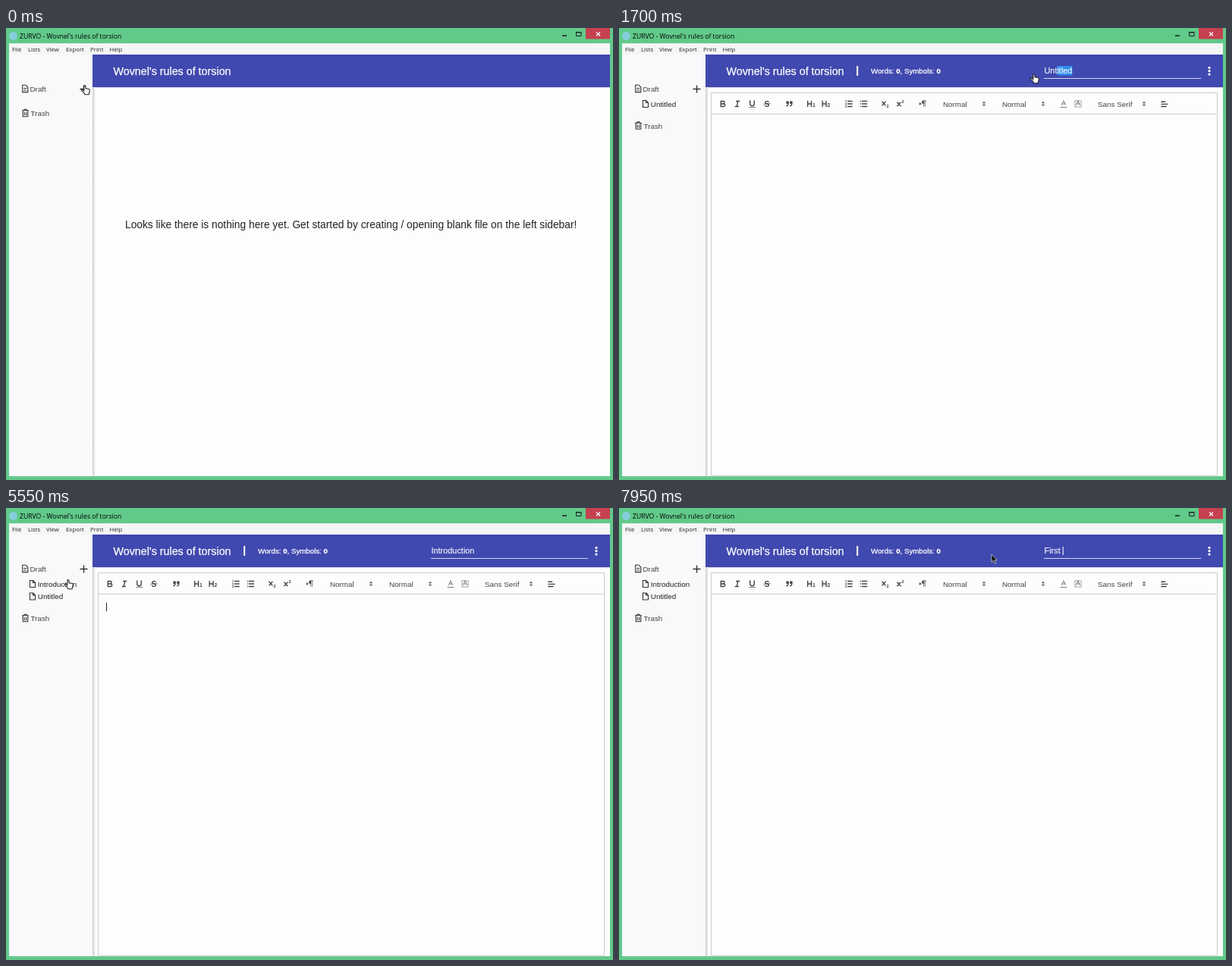
Write an HTML page that moves like this. It is 800 px wide and 596 px high and loops after 8 s.

```html
<!DOCTYPE html>
<html lang="en">
<head>
<meta charset="utf-8">
<title>Editor</title>
<style>
html, body { margin: 0; width: 100%; height: 100%; overflow: hidden; background: #61c98a }
svg { display: block; width: 800px; height: 596px; font: 9.86px "Liberation Sans", Arial, sans-serif }
text { white-space: pre }
.ui { font-family: "Open Sans", "Noto Sans", sans-serif }
.ink { fill: none; stroke: #444; stroke-width: 2; stroke-linecap: round; stroke-linejoin: round }
.ink .thin { stroke-width: 1 }
.ink .fill, .ink text { fill: #444; stroke: none }
.side { fill: #444 }
.outline { fill: none; stroke: #333; stroke-width: 1.1 }
.med { fill: #fff; stroke: #fff; stroke-width: .25px }
</style>
</head>
<body>
<svg id="stage" viewBox="0 0 800 596">
  <defs>
    <linearGradient id="shade"><stop stop-color="#000" stop-opacity=".2"/><stop offset="1" stop-color="#000" stop-opacity="0"/></linearGradient>
    <g id="file" class="outline"><path d="M.5.5h4.2l2.8 2.8v6.2h-7zM4.5.5v3h3"/></g>
  </defs>
  <rect width="800" height="596" fill="#61c98a"/>
  <circle cx="9.5" cy="10.5" r="5.5" fill="#84cfdb"/>
  <text class="ui" x="18" y="14" font-size="8.65">ZURVO - Wovnel's rules of torsion</text>
  <path d="M733 10.2h6" stroke="#222" stroke-width="1.6"/>
  <path d="M751.5 5.5h6.5v5h-6.5zM751 6h7.5" fill="none" stroke="#222"/>
  <rect x="764" width="32" height="14.5" fill="#c5414f"/>
  <path d="M778 5.5l5 5m0-5l-5 5" stroke="#fff" stroke-width="1.2"/>
  <rect x="4" y="20.5" width="792" height="570.5" fill="#fefdfe"/>
  <rect x="4" y="20.5" width="792" height="14.5" fill="#f6f5f6"/>
  <g id="menu" class="ui" font-size="7.8" fill="#222"></g>
  <rect x="4" y="35" width="110" height="556" fill="#f9f8fb"/>
  <rect x="114" y="35" width="4" height="556" fill="url(#shade)"/>
  <rect x="114" y="35" width="682" height="43" fill="#4049af"/>
  <rect x="118" y="78" width="678" height="1" fill="#d9d9e3"/>
  <text class="med" x="141.5" y="61.5" font-size="14.3">Wovnel's rules of torsion</text>

  <g class="side">
    <path class="outline" d="M21.7 75.2h4.3l2.8 2.8v6.6h-7.1zM23.2 79.5h4M23.2 82h4"/>
    <text x="31.5" y="83.5">Draft</text>
    <path d="M97.5 80.5h10m-5-5v10" stroke="#333" stroke-width="1.4"/>
    <g id="items" fill="#222"></g>
    <g id="trash">
      <path class="outline" d="M21 -6.2h9M24 -6.5v-1.3h3v1.3M22.2 -6v7.8h6.6v-7.8M24.3 -4v4.3M26.7 -4v4.3"/>
      <text x="32.5" y="1">Trash</text>
    </g>
  </g>

  <text id="empty" x="157" y="264" font-size="13.78" fill="#222">Looks like there is nothing here yet. Get started by creating / opening blank file on the left sidebar!</text>

  <g id="editor">
    <path d="M314.2 50v13" stroke="#fff" stroke-width="2"/>
    <text class="med" x="332" y="60" font-size="9.7">Words: <tspan font-weight="bold">0</tspan>, Symbols: <tspan font-weight="bold">0</tspan></text>
    <rect id="sel" y="50" height="12.5" fill="#2f8ef0"/>
    <text id="name" class="med" x="560.5" y="60" font-size="10.9" style="stroke-width:.1px"></text>
    <rect id="nameCaret" y="51" width="1" height="11" fill="#fff"/>
    <path d="M560 66.5h207" stroke="#d5d7ef"/>
    <g fill="#fff"><circle cx="778" cy="52.3" r="1.6"/><circle cx="778" cy="56.7" r="1.6"/><circle cx="778" cy="61.1" r="1.6"/></g>
    <path d="M121.5 85.5h667v504.500h-667zM121.500 113.5h667" fill="none" stroke="#ccc"/>
    <g id="tools" class="ink"></g>
    <path id="bodyCaret" d="M132.5 125v11" stroke="#222"/>
  </g>

  <g id="toast">
    <rect x="301" y="558" width="198" height="33" rx="3" fill="#323032"/>
    <text class="med" x="373" y="578">Created!</text>
  </g>
  <rect y="591" width="800" height="5" fill="#61c98a"/>

  <g id="cursor">
    <path id="arrow" d="M0 0v10.500l2.400-2.200 1.700 4 1.700-.8-1.700-3.800h3.300z" fill="#111" stroke="#fff" stroke-width=".6"/>
    <path id="hand" d="M1 1.200q1.300-1.200 2 .3v3.200l4.200.8q1.200.4 1.100 1.800l-.6 3.200-.8 2.200h-5l-1.300-2.300-3.200-3q.3-1.500 1.800-.8l1.500 1.200z" fill="#fff" stroke="#222" stroke-width="1.100"/>
  </g>
</svg>
<script>
const el = id => document.getElementById(id);
const show = (id, on) => el(id).setAttribute("visibility", on ? "visible" : "hidden");
const label = (x, y, s, more = "") => `<text x="${x}" y="${y}" ${more}>${s}</text>`;

el("menu").innerHTML = [[8, "File"], [29, "Lists"], [53, "View"], [79, "Export"], [111, "Print"], [136.500, "Help"]]
  .map(([x, s]) => label(x, 30.5, s)).join("");

// Toolbar icons live in an 18-unit box centred on (x, 100)
const icon = (x, body, id = "") => `<g id="${id}" transform="translate(${x - 6.2} 93.800) scale(.69)">${body}</g>`;
const path = (d, cls = "") => `<path class="${cls}" d="${d}"/>`;
const bold = (x, y, s, size) => label(x, y, s, `font-size="${size}" font-weight="bold"`);
const updown = path("M7 11l2 2 2-2zM7 7l2-2 2 2z", "fill") + path("M7 11l2 2 2-2zM7 7l2-2 2 2z", "thin");
const letterA = path("M5.500 11L9 3l3.500 8M6.400 9h5.200", "thin");

el("tools").innerHTML = [
  icon(137, path("M5 4h4.500a2.500 2.500 0 0 1 0 5H5zM5 9h5.500a2.500 2.500 0 0 1 0 5H5z")),
  icon(156, path("M7 4h6M5 14h6M8 14l2-10")),
  icon(175.500, path("M5 3v6a4 4 0 0 0 8 0V3") + path("M3 15.500h12", "thin")),
  icon(195, bold(4, 14.500, "S", 15) + path("M2.500 9.500l13-1", "thin")),
  icon(224.500, path("M4 5h3v3H4zM11 5h3v3h-3z", "fill") + path("M4 5h3v3H4zM11 5h3v3h-3zM7 8q0 4-3 5M14 8q0 4-3 5")),
  icon(253.500, path("M2 4v10M9 4v10M2 9h7") + bold(11, 15, "1", 10)),
  icon(273, path("M2 4v10M9 4v10M2 9h7") + bold(11, 15, "2", 10)),
  icon(303, path("M7 4h8M7 9h8M7 14h8") + path("M2.500 3l1-1v4M2.500 8h1.500l-1.500 2.500h2M2.500 12.500h1.800l-1 1.500 1 1.500h-1.800", "thin")),
  icon(322.500, path("M6 4h9M6 9h9M6 14h9M3 4v.01M3 9v.01M3 14v.01"), "bullets"),
  icon(351, path("M3 5l6 7M9 5l-6 7") + bold(11, 16, "2", 8)),
  icon(371, path("M3 6l6 7M9 6l-6 7") + bold(11, 8, "2", 8)),
  icon(400, path("M3 6l4 3-4 3z", "fill") + path("M11 3a3 3 0 0 0 0 6zM11 3h5M11 4v10M14 4v10", "thin") + path("M11 3a3 3 0 0 0 0 6z", "fill")),
  label(427, 103.500, "Normal"), icon(481, updown),
  label(505, 103.500, "Normal"), icon(559, updown),
  icon(586, letterA + path("M3 15.500h12", "thin")),
  icon(605, letterA + `<rect class="thin" x="3" y="3" width="12" height="12" stroke-dasharray="1 2"/>`),
  label(631, 103.500, "Sans Serif"), icon(692, updown),
  icon(719, path("M3 5h7M3 9.500h12M3 14h9"))
].join("");

const LOOP = 8000;
const route = [
  [0, 102, 75], [150, 102, 75], [600, 228, 120], [750, 220, 119], [1000, 60, 96], [1100, 60, 96],
  [1400, 600, 53], [1500, 600, 53], [1700, 545, 60], [1900, 476, 62], [4200, 476, 62],
  [4500, 430, 122], [4650, 430, 122], [4850, 253, 111], [5150, 102, 76], [5400, 102, 76],
  [5700, 58, 112], [5850, 58, 112], [6150, 584, 52], [6300, 600, 53], [6450, 600, 53],
  [6750, 496, 62], [6900, 491, 61], [LOOP, 491, 61]
];
const typing = [
  ["Introduction", [2600, 2650, 2700, 2850, 2900, 2950, 3150, 3400, 3450, 3500, 3550, 3600]],
  ["First ", [7200, 7300, 7400, 7450, 7550, 7700]]
];
const within = (t, a, b) => t >= a && t < b;
const clamp = v => Math.min(1, Math.max(0, v));
const ease = v => v * v * (3 - 2 * v);

function pointer(t) {
  const i = route.findIndex(p => p[0] > t);
  const [a, x, y] = route[i - 1], [b, u, v] = route[i];
  const k = ease((t - a) / (b - a));
  return [x + (u - x) * k, y + (v - y) * k];
}

function nameAt(t) {
  const [word, times] = typing[t < 5950 ? 0 : 1];
  return word.slice(0, times.filter(k => k <= t).length) || "Untitled";
}

// First selected letter while dragging leftwards; 8 means nothing is selected
function dragStart(t) {
  if (within(t, 1500, 2600)) return Math.max(0, Math.round(8 - (t - 1500) / 40));
  if (within(t, 6450, 7200)) return Math.max(0, Math.round(8 - (t - 6450) / 35));
  return 8;
}

function drawName(t) {
  const name = el("name"), sel = el("sel");
  name.textContent = nameAt(t);
  const end = 560.5 + name.getComputedTextLength();
  const first = dragStart(t);
  const from = first ? 560.5 + name.getSubStringLength(0, Math.min(first, name.textContent.length)) : 560.5;
  sel.setAttribute("x", from);
  sel.setAttribute("width", first < 8 ? Math.max(0, end - from) : 0);
  el("nameCaret").setAttribute("x", end);
  show("nameCaret", within(t, 2600, 4250) || t >= 7200);
}

function draw(t) {
  const items = t < 250 ? [] : [t < 4300 ? "Untitled" : "Introduction"];
  if (t >= 5400) items.push("Untitled");
  el("items").innerHTML = items.map((s, i) =>
    `<use href="#file" x="31" y="${95 + i * 16.500}"/>` + label(41.8, 103.500 + i * 16.500, s)).join("");
  el("trash").setAttribute("transform", `translate(0 ${items.length ? 115 + items.length * 16.500 : 115})`);

  const open = t >= 1100;
  el("empty").style.display = open ? "none" : "";
  el("editor").style.display = open ? "" : "none";
  if (open) drawName(t);
  show("bodyCaret", within(t, 4500, 6300));
  el("bullets").style.stroke = within(t, 4800, 4900) ? "#06c" : "";

  const start = t < 4000 ? 350 : 5550;
  const up = ease(clamp((t - start) / 200)) - ease(clamp((t - start - 950) / 200));
  el("toast").setAttribute("transform", `translate(0 ${(1 - up) * 40})`);

  const [x, y] = pointer(t);
  el("cursor").setAttribute("transform", `translate(${x} ${y})`);
  const hand = t < 250 || within(t, 950, 1750) || within(t, 5100, 6500);
  show("hand", hand);
  show("arrow", !hand);
}

const begin = performance.now();
function tick() {
  const t = (performance.now() - begin) % LOOP;
  draw(Math.floor(t / 50) * 50);
  requestAnimationFrame(tick);
}
tick();
</script>
</body>
</html>
```
